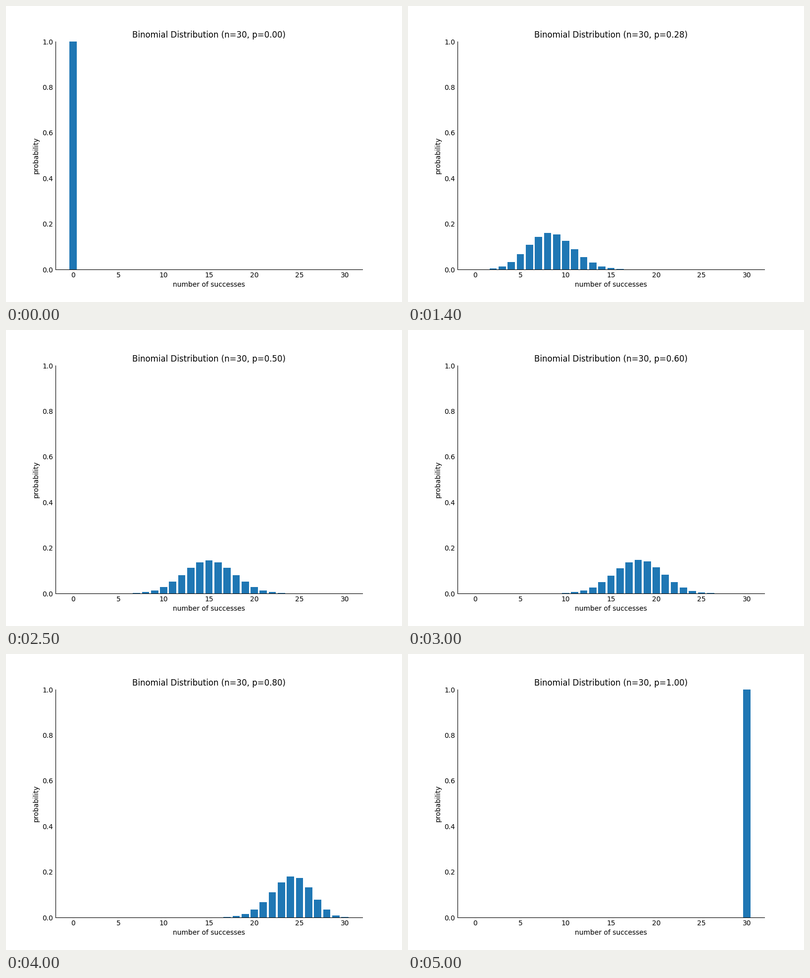
Recreate the animation shown at these times as a matplotlib script. Size 800 px wide and 600 px high, loop 5.1 s.

```python
import math

import matplotlib.pyplot as plt
from matplotlib.animation import FuncAnimation

N = 30
STEPS = 50
INTERVAL = 100

plt.rcParams["font.family"] = "DejaVu Sans"


def binomial_pmf(k, p):
    return math.comb(N, k) * p**k * (1 - p) ** (N - k)


fig, ax = plt.subplots(figsize=(8, 6), dpi=100)
bars = ax.bar(range(N + 1), [0] * (N + 1), width=0.8, color="#1f77b4")
title = ax.set_title("")

ax.set_ylim(0, 1)
ax.set_xlabel("number of successes")
ax.set_ylabel("probability")
ax.tick_params(length=0)
ax.spines[["top", "right"]].set_visible(False)


def update(i):
    p = i / STEPS
    for k, bar in enumerate(bars):
        bar.set_height(binomial_pmf(k, p))
    title.set_text(f"Binomial Distribution (n={N}, p={p:.2f})")
    return [*bars, title]


anim = FuncAnimation(
    fig, update, frames=STEPS + 1, interval=INTERVAL, repeat=True, repeat_delay=0
)

plt.show()
```
